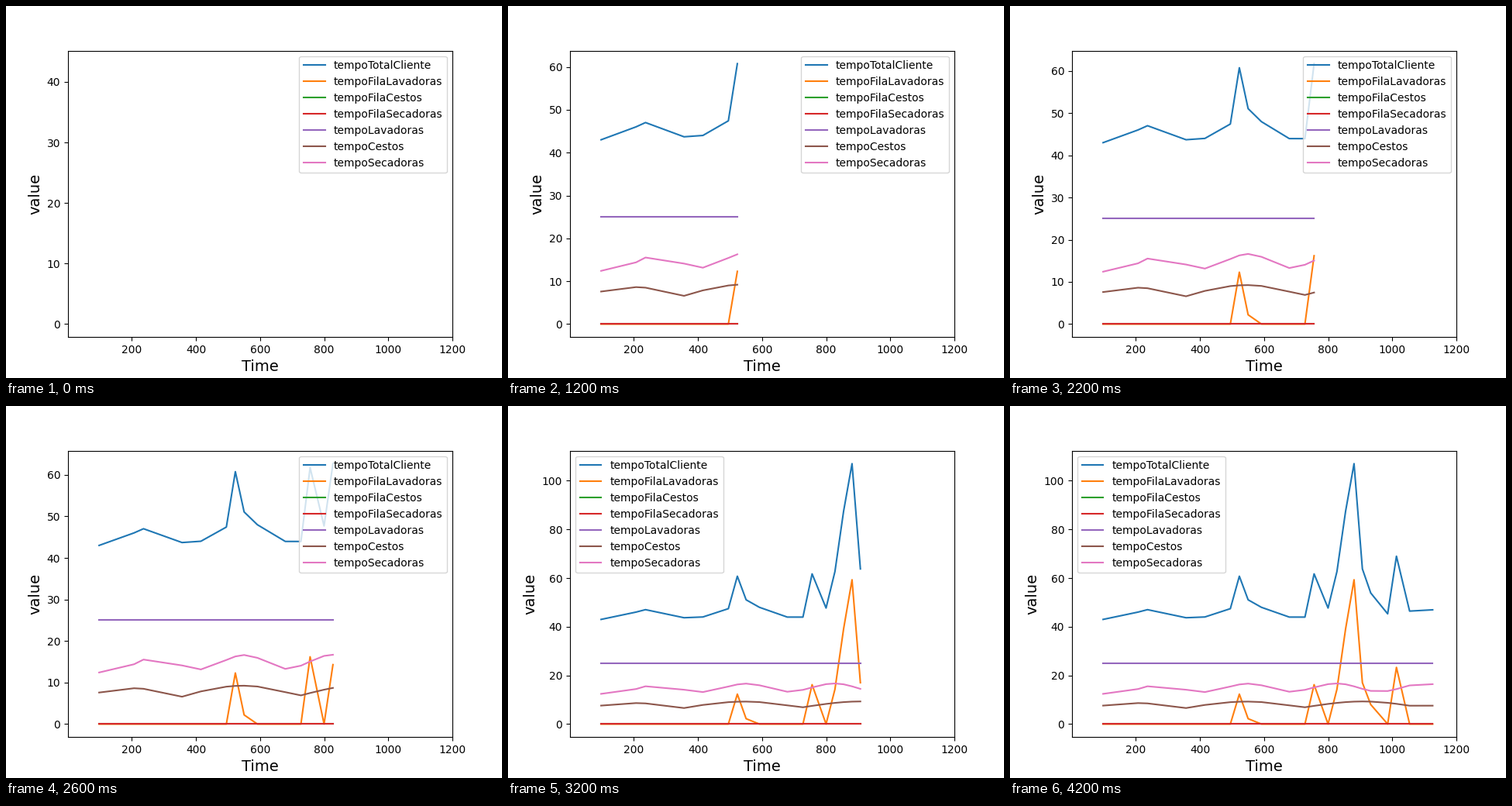
Animation, 640 px wide and 480 px high, one loop 8800 ms. Source, as a matplotlib script:

```python
import numpy as np
import matplotlib.pyplot as plt
from matplotlib.animation import FuncAnimation

STEP_MS = 200
LOOP_MS = 8800
WASH = 25
WASHER_CYCLE = 27  # wash plus changeover
WASH_STAGE = 23    # share of the total spent before the basket

# A single-washer laundry: customers queue, wash, take a basket, then dry.
arrival = np.array([55, 161, 189.5, 313, 371.5, 447.5, 462.2, 499.3, 543.8, 634.8, 683.6,
                    694.4, 752, 764.7, 766.9, 773.7, 843, 879, 940.3, 944, 1007.6, 1079])


def wash_starts(arrivals):
    """Each wash waits for both its customer and the free washer."""
    starts, free = [], 0
    for moment in arrivals:
        starts.append(max(moment, free))
        free = starts[-1] + WASHER_CYCLE
    return np.array(starts)


start = wash_starts(arrival)
warm_up = np.exp(-(start - 55) / 150)
washer_queue = start - arrival
basket = 6.8 + 2.5 * np.abs(np.sin(np.pi * (start - 313) / 365)) - 1.2 * warm_up
dryer = 15 - 1.7 * np.cos(2 * np.pi * (start - 90) / 275) - 1.4 * warm_up
total = washer_queue + WASH_STAGE + basket + dryer
time = arrival + total

series = {
    "tempoTotalCliente": total,
    "tempoFilaLavadoras": washer_queue,
    "tempoFilaCestos": np.zeros_like(time),
    "tempoFilaSecadoras": np.zeros_like(time),
    "tempoLavadoras": np.full_like(time, WASH),
    "tempoCestos": basket,
    "tempoSecadoras": dryer,
}

fig, ax = plt.subplots(figsize=(6.4, 4.8), dpi=100)
lines = [ax.plot([], [], label=name)[0] for name in series]
ax.set_xlim(1, 1200)
ax.set_xlabel("Time", fontsize=14)
ax.set_ylabel("value", fontsize=14)
legend = ax.legend(loc="upper right")


def draw(frame):
    count = min(frame + 1, len(time))
    for line, values in zip(lines, series.values()):
        line.set_data(time[:count], values[:count])
    top = total[:count].max()
    ax.set_ylim(-0.05 * top, 1.05 * top)
    # The legend moves aside once the curve climbs into its corner
    legend.set_loc("upper right" if top < 80 else "upper left")
    return lines


anim = FuncAnimation(fig, draw, frames=LOOP_MS // STEP_MS, init_func=lambda: draw(0),
                     interval=STEP_MS, repeat=True, repeat_delay=0)
plt.show()
```
